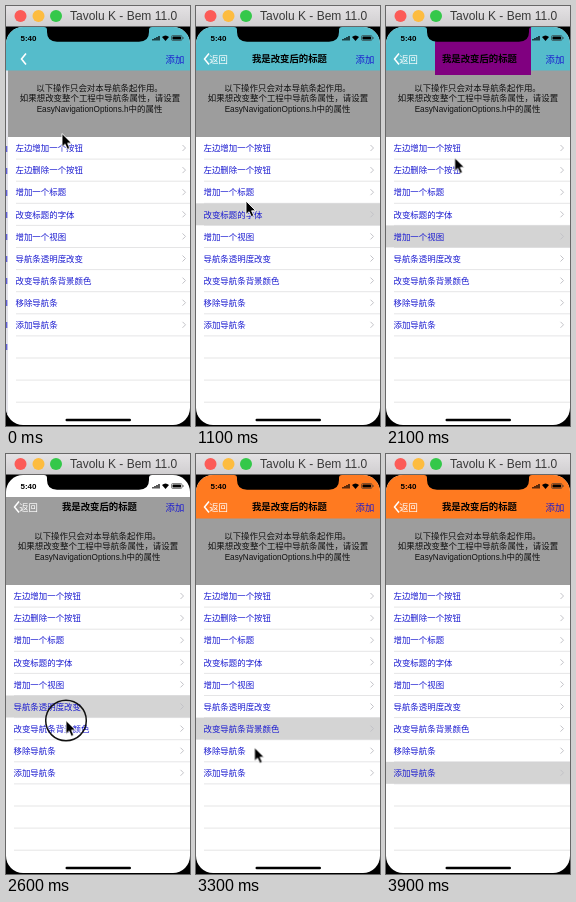
An HTML page for the animation above (4 s loop, 184 px wide and 420 px high).

```html
<!DOCTYPE html>
<html lang="zh-CN">
<head>
<meta charset="utf-8">
<title>Navigation bar demo</title>
<style>
  html, body { margin: 0; width: 100%; height: 100%; overflow: hidden; background: #000; }
  svg { display: block; width: 184px; height: 420px; }
  text { font: 8.45px "Liberation Sans", "Noto Sans CJK SC", "Noto Sans CJK", sans-serif; }
  .mid { text-anchor: middle; }
  .link { fill: #1a1ad0; }
  .nav { font-size: 9.4px; }
  .latin { font-size: 8.2px; }
  .caption { font-size: 12px; fill: #3a3a3a; }
  .clock { font-size: 8px; font-weight: 700; }
  #title { font-weight: 600; }

  /* 100 ms = 2.5 % of the loop */
  .anim { animation: 4s step-end infinite; }
  #page { animation-name: push; }
  #old, #bigBack { animation-name: old; }
  #back { animation-name: back; }
  #pick { animation-name: pick; }
  #bar { animation-name: bar; }
  #navbar { animation-name: navbar; }
  #title { animation-name: title; }
  #box { animation-name: box; }
  #ring { animation-name: ring; }
  #cursor { animation-name: move; }
  #arrow { animation-name: arrow; }

  @keyframes push { 0% { transform: translateX(2px); } 2.5%, 100% { transform: none; } }
  @keyframes old { 0% { opacity: 1; } 2.5%, 100% { opacity: 0; } }
  @keyframes back { 0% { opacity: 0; } 2.5%, 100% { opacity: 1; } }
  @keyframes pick {
    0% { opacity: 0; transform: none; }
    7.5% { opacity: 1; transform: none; }
    12.5% { opacity: 1; transform: translateY(22.1px); }
    20% { opacity: 1; transform: translateY(44.2px); }
    25% { opacity: 1; transform: translateY(66.3px); }
    35% { opacity: 1; transform: translateY(88.4px); }
    57.5% { opacity: 1; transform: translateY(110.5px); }
    72.5% { opacity: 1; transform: translateY(132.6px); }
    87.5% { opacity: 1; transform: translateY(154.7px); }
    95%, 100% { opacity: 1; transform: translateY(176.8px); }
  }
  @keyframes bar {
    0% { fill: #55bccb; fill-opacity: 1; }
    57.5% { fill: #55bccb; fill-opacity: 0; }
    72.5%, 100% { fill: #ff7a20; fill-opacity: 1; }
  }
  @keyframes navbar { 0% { opacity: 1; } 87.5% { opacity: 0; } 95%, 100% { opacity: 1; } }
  @keyframes title { 0% { opacity: 0; } 20%, 100% { opacity: 1; } }
  @keyframes box { 0% { opacity: 0; } 35% { opacity: 1; } 55%, 100% { opacity: 0; } }
  @keyframes ring { 0% { opacity: 0; } 62.5% { opacity: 1; } 67.5%, 100% { opacity: 0; } }
  @keyframes arrow { 0% { opacity: 1; } 95%, 100% { opacity: 0; } }
  @keyframes move {
    0% { transform: translate(56px, 127.5px); animation-timing-function: steps(3); }
    7.5% { transform: translate(62px, 142px); animation-timing-function: steps(2); }
    12.5% { transform: translate(64px, 163px); animation-timing-function: steps(3); }
    20% { transform: translate(60px, 187px); animation-timing-function: steps(2); }
    25% { transform: translate(54px, 208px); animation-timing-function: steps(1); }
    27.5% { transform: translate(50px, 195px); animation-timing-function: steps(3); }
    35% { transform: translate(62px, 228px); animation-timing-function: steps(2); }
    40% { transform: translate(69px, 105px); animation-timing-function: steps(4); }
    50% { transform: translate(72px, 100px); animation-timing-function: steps(3); }
    57.5% { transform: translate(62px, 255px); animation-timing-function: steps(3); }
    65% { transform: translate(60px, 266.5px); animation-timing-function: steps(4); }
    75% { transform: translate(60px, 276px); animation-timing-function: steps(3); }
    82.5% { transform: translate(58.5px, 293.5px); animation-timing-function: steps(2); }
    87.5% { transform: translate(58px, 297px); animation-timing-function: steps(2); }
    92.5%, 100% { transform: translate(54px, 318px); }
  }
</style>
</head>
<body>
<svg viewBox="0 0 184 420">
  <defs>
    <clipPath id="screen"><rect y="21" width="184" height="398" rx="17"/></clipPath>
    <linearGradient id="chrome" x2="0" y2="1">
      <stop stop-color="#e4e2e4"/><stop offset="1" stop-color="#d0ced0"/>
    </linearGradient>
  </defs>
  <rect width="184" height="420"/>

  <g clip-path="url(#screen)">
    <rect y="21" width="184" height="399" fill="#fff"/>
    <g id="old" class="anim">
      <rect y="64" width="2" height="356" fill="#e4e4ea"/>
      <path d="M.7 140V345" stroke="#5555d8" stroke-width="1.2" stroke-dasharray="6 16"/>
    </g>

    <g id="page" class="anim">
      <rect y="43" width="184" height="88" fill="#9d9d9d"/>
      <g fill="#111">
        <text class="mid" x="91.5" y="84.5">以下操作只会对本导航条起作用。</text>
        <text class="mid" x="92" y="95">如果想改变整个工程中导航条属性，请设置</text>
        <text class="mid" x="91.5" y="105.5"><tspan class="latin">EasyNavigationOptions.h</tspan>中的属性</text>
      </g>
      <rect id="pick" class="anim" y="131" width="184" height="22" fill="#d4d4d4"/>
      <g id="rows"></g>
    </g>

    <g id="navbar" class="anim">
      <rect id="bar" class="anim" y="21" width="184" height="43.5"/>
      <rect id="box" class="anim" x="49" y="21" width="96" height="48" fill="#800080"/>
      <path id="bigBack" class="anim" d="M20 47.5L15.5 53L20 58.5" fill="none" stroke="#fff" stroke-width="1.6"/>
      <g id="back" class="anim">
        <path d="M13 47.5L8.5 53L13 58.5" fill="none" stroke="#fff" stroke-width="1.5"/>
        <text class="nav" x="13.2" y="56.5" fill="#fff">返回</text>
      </g>
      <text id="title" class="anim nav mid" x="93.5" y="56.3">我是改变后的标题</text>
      <text class="nav link" x="159.5" y="56.5">添加</text>
    </g>

    <path d="M38 21Q41 21 41 24V26Q41 35.7 51 35.7H133Q143 35.7 143 26V24Q143 21 146 21Z"/>
    <text class="clock" x="14.5" y="35">5:40</text>
    <path d="M147 34.5V33M149 34.5V32M151 34.5V31M153 34.5V30" stroke="#000" stroke-width="1.3"/>
    <path d="M156 31Q159.5 28 163 31L159.5 35Z"/>
    <rect x="165.5" y="29.5" width="10.5" height="5" rx="1.3" fill="none" stroke="#333" stroke-width=".6"/>
    <rect x="166.5" y="30.5" width="8.5" height="3" rx=".6"/>
    <path d="M177 31V33" stroke="#333" stroke-width=".8"/>
    <rect x="59.5" y="412.8" width="65.5" height="2.5" rx="1.2"/>
  </g>

  <rect width="184" height="20.5" fill="url(#chrome)"/>
  <circle cx="14.5" cy="10" r="6" fill="#fc5b57"/>
  <circle cx="32.5" cy="10" r="6" fill="#fdbc40"/>
  <circle cx="50" cy="10" r="6" fill="#34c84a"/>
  <text class="caption" x="64" y="14.3">Tavolu K - Bem 11.0</text>

  <circle id="ring" class="anim" cx="60" cy="266.5" r="20.3" fill="none" stroke="#111" stroke-width="1.5"/>
  <g id="cursor" class="anim">
    <path id="arrow" class="anim" d="M0 0V13.5L3.1 10.7L5.3 15.7L7.8 14.6L5.6 9.8H9.8Z" stroke="#fff" stroke-width=".9"/>
  </g>
</svg>

<script>
  const labels = ['左边增加一个按钮', '左边删除一个按钮', '增加一个标题', '改变标题的字体', '增加一个视图',
    '导航条透明度改变', '改变导航条背景颜色', '移除导航条', '添加导航条'];
  const pitch = 22.1;

  const line = y => `<path d="M8 ${y}H184" stroke="#d3d3d6" stroke-width=".6"/>`;
  const row = (label, i) => {
    const y = 142 + i * pitch;
    return `<text class="link" x="7.5" y="${y + 3.2}">${label}</text>
      <path d="M174.5 ${y - 3}l3 3l-3 3" fill="none" stroke="#c2c2c7"/>`;
  };
  const lines = Array.from({ length: 12 }, (_, i) => line(131 + (i + 1) * pitch));
  document.getElementById('rows').innerHTML = lines.join('') + labels.map(row).join('');
</script>
</body>
</html>
```
